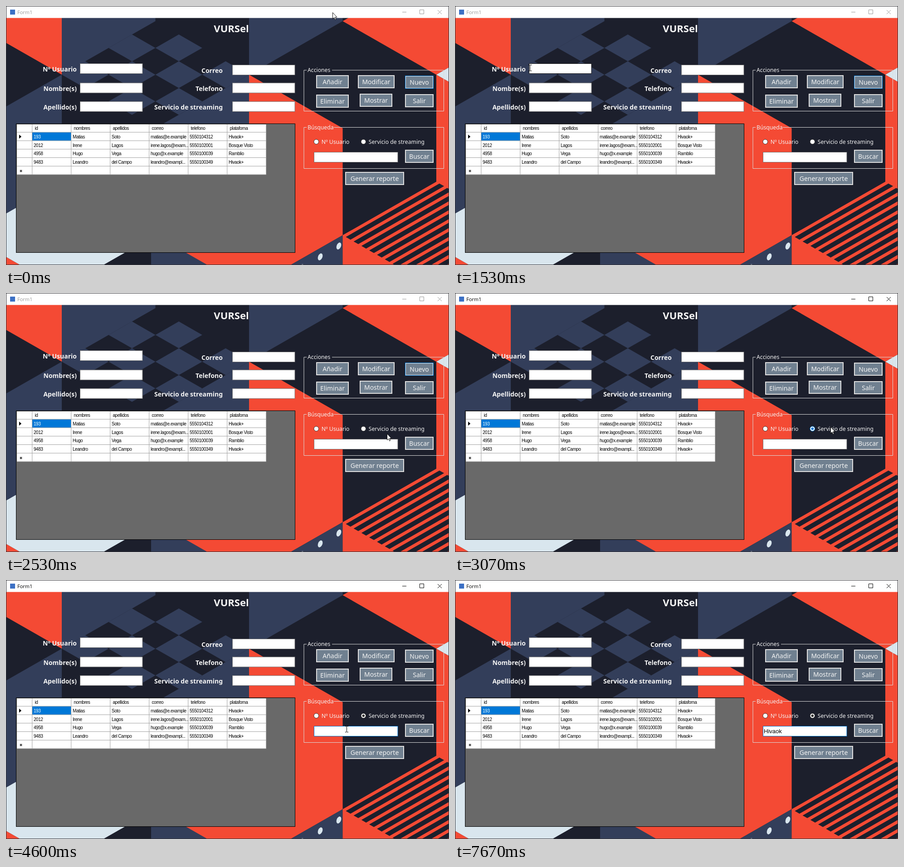
An HTML page for the animation above (8000 ms loop, 977 px wide and 573 px high).

```html
<!DOCTYPE html>
<html lang="es">
<head>
<meta charset="utf-8">
<style>
html, body { margin: 0; width: 100%; height: 100%; overflow: hidden; background: #1c1f2c; }
svg { display: block; width: 977px; height: 573px; }
text { font-family: "Noto Sans", "Open Sans", sans-serif; fill: #f4f4f4; white-space: pre; }
.title { font-size: 22px; font-weight: 700; text-anchor: middle; }
.label { font-size: 14px; font-weight: 600; text-anchor: end; }
.button { font-size: 14px; text-anchor: middle; }
.small { font-size: 12.2px; }
.caption { font: 11px "Open Sans", sans-serif; fill: inherit; }
.cell { font: 10px "Liberation Sans", Arial, sans-serif; letter-spacing: -.45px; fill: #000; }
.selected { fill: #fff; }
.typed { font: 13px "Liberation Sans", Arial, sans-serif; fill: #000; }
</style>
</head>
<body>
<svg id="stage" viewBox="0 0 977 573"></svg>
<script>
const DARK = '#1c1f2c', NAVY = '#333e5a', RED = '#f44a34', PALE = '#d9e6ee';
const BLUE = '#0078d7', GRAY = '#7a7a7a', LIGHT = '#e1e1e1';
const FRAME_MS = 200 / 3;
const stage = document.getElementById('stage');

const rect = (x, y, w, h, fill, extra = '') =>
  `<rect x="${x}" y="${y}" width="${w}" height="${h}" fill="${fill}" ${extra}/>`;
const text = (x, y, content, cls) => `<text x="${x}" y="${y}" class="${cls}">${content}</text>`;
const line = (d, stroke) => `<path d="${d}" fill="none" stroke="${stroke}"/>`;

// The backdrop lies on an isometric lattice; points are given in lattice units.
const poly = (fill, ...nodes) => `<polygon fill="${fill}" points="${
  nodes.map(([i, j]) => [123 + 206.5 * i, 33.5 + 118.4 * j]).join(' ')}"/>`;
// Part of the rhombus with left corner (i, j): a runs up its edge, b runs down.
function rhombus(fill, i, j, a0 = 0, a1 = 1, b0 = 0, b1 = 1) {
  const at = (a, b) => [i + a + b, j - a + b];
  return poly(fill, at(a0, b0), at(a1, b0), at(a1, b1), at(a0, b1));
}

function background() {
  let out = rect(0, 0, 977, 573, DARK)
    + poly(RED, [-1, -1], [0, -1], [0, 1], [-1, 0])
    + poly(NAVY, [0, -1], [1, -1], [1, 0], [0, 1])
    + poly(NAVY, [-1, 2], [0, 1], [0, 3], [-1, 4])
    + poly(RED, [-1, 4], [0, 5], [-1, 5])
    + rhombus(PALE, -1, 4)
    + rect(320, 500, 10, 73, NAVY)
    + poly(NAVY, [1, 2], [2, 1], [2, 5], [1, 5])
    + poly(NAVY, [2, -1], [3, -1], [3, 0], [2, 1])
    + poly(RED, [2, 1], [3, 2], [3, 4], [2, 5], [1, 4], [2, 3])
    + poly(NAVY, [3, 4], [3, 6], [2, 5])
    + rhombus(RED, 3, 0)
    + rhombus(PALE, 4, 1)
    + poly(RED, [4, 1], [5, 2], [5, 5], [3, 6], [3, 4], [4, 3]);
  for (let a = 0; a < 4; a++)
    for (let b = a % 2; b < 4; b += 2)
      out += rhombus(NAVY, 0, 1, a / 4, (a + 1) / 4, b / 4, (b + 1) / 4);
  for (let k = 0; k < 12; k++)
    out += rhombus(DARK, 3, 4, 0, 1, (k + .4) / 12, (k + 1) / 12);
  for (let k = 0; k < 3; k++)
    out += `<ellipse rx="4.8" ry="8" fill="${PALE}" transform="translate(${734 - 41 * k} ${531 + 24 * k}) rotate(22)"/>`;
  return out;
}

const titleBar = () => rect(0, 0, 977, 26.5, '#fff') + rect(9, 8, 11, 11, '#3c70c4')
  + `<g id="caption">${text(25, 17.5, 'Form1', 'caption')}
     <path d="M874 13.5H883M912.5 8.5H921.5V17.5H912.5ZM952 9L961 18M961 9L952 18" fill="none"/></g>`;

const textBox = (x, y, w, id = '') =>
  rect(x + .5, y + .5, w - 1, 22, '#fff', `id="${id}" stroke="${GRAY}"`);

const fields = (x, labelEnd, top, names) => names.map((name, i) => {
  const y = i ? 128.5 + 41.2 * i : top;
  return textBox(x, y, 138.5, name === 'Nº Usuario' ? 'userBox' : '')
    + text(labelEnd, y + 18, name, 'label');
}).join('');

const button = (x, y, w, name) => rect(x + 1, y + 1, w - 2, 27, '#708090', `stroke="${LIGHT}" stroke-width="2"`)
  + text(x + w / 2, y + 20, name, 'button');

const group = (y, bottom, legend, gapEnd) =>
  line(`M663 ${y}H657V${bottom}H965.5V${y}H${gapEnd}`, '#dcdcdc') + text(665, y + 4, legend, 'small');

const radio = (x, id, name) =>
  `<circle id="${id}" cx="${x}" cy="300.3" r="5.3" fill="#fff" stroke="#333"/>` + text(x + 11.5, 305, name, 'small');

function table() {
  const rows = [
    ['id', 'nombres', 'apellidos', 'correo', 'telefono', 'platafoma'],
    ['193', 'Matias', 'Soto', 'matias@e.example', '5550104312', 'Hivaok+'],
    ['2012', 'Irene', 'Lagos', 'irene.lagos@exam...', '5550102001', 'Bosque Visto'],
    ['4958', 'Hugo', 'Vega', 'hugo@x.example', '5550100039', 'Ramblio'],
    ['9483', 'Leandro', 'del Campo', 'leandro@exampl...', '5550100349', 'Hivaok+']
  ];
  const colX = i => 57.7 + 86 * i, rowY = j => 260.5 + 18.75 * j;
  let out = rect(22.5, 260.5, 615, 285, '#696969', 'stroke="#000"')
    + rect(24, 262, 550, 111, '#fff') + rect(colX(0), rowY(1), 86, 18.75, BLUE);
  for (let k = 0; k < 7; k++)
    out += line(`M${colX(k)} 262V373`, '#a0a0a0') + (k ? line(`M24 ${rowY(k)}H574`, '#a0a0a0') : '');
  rows.forEach((row, j) => row.forEach((value, i) => {
    out += text(colX(i) + (j ? 3.3 : 5.8), rowY(j) + 13.5, value, j === 1 && i === 0 ? 'cell selected' : 'cell');
  }));
  return out + '<path d="M29 284.5L34 289L29 293.5Z"/>'
    + line('M33 362V368M30.5 363.5L35.5 366.5M35.5 363.5L30.5 366.5', '#000');
}

const cursors = `
  <path id="arrow" d="M.5 .5V14.5L3.7 11.6L5.7 16.4L7.8 15.5L5.8 10.8H10Z" fill="#fff" stroke="#000" stroke-width=".9"/>
  <path id="beam" d="M-3 -6.5H0M1 -6.5H4M.5 -6V6M-3 6.5H0M1 6.5H4" fill="none" stroke="#000"/>
  <path id="resize" d="M-9 0L-4.5 -4V-1.3H4.5V-4L9 0L4.5 4V1.3H-4.5V4Z" fill="#fff" stroke="#000" stroke-width=".9"/>`;

stage.innerHTML = background() + titleBar() + text(497, 58, 'VURSel', 'title')
  + fields(163, 156, 127, ['Nº Usuario', 'Nombre(s)', 'Apellido(s)'])
  + fields(499, 478, 130, ['Correo', 'Telefono', 'Servicio de streaming'])
  + group(142, 232.5, 'Acciones', 719)
  + button(684, 153, 72, 'Añadir') + button(776, 153, 81, 'Modificar') + button(880, 154, 63, 'Nuevo')
  + rect(880.5, 154.5, 62, 28, 'none', `id="defaultFrame" stroke="${BLUE}"`)
  + button(684, 196, 72, 'Eliminar') + button(780, 194, 72, 'Mostrar') + button(880, 195, 63, 'Salir')
  + group(268.5, 359.5, 'Búsqueda', 723)
  + radio(684.3, 'byUser', 'Nº Usuario') + radio(788.3, 'byService', 'Servicio de streaming')
  + '<circle id="dot" cx="788.3" cy="300.3" r="2.8"/>'
  + textBox(679, 323, 185.5, 'searchBox') + button(880, 318, 63, 'Buscar')
  + button(748, 367, 130, 'Generar reporte')
  + table() + text(681, 339, '', 'typed" id="query') + rect(681, 326, 1, 16, '#000', 'id="caret"')
  + `<g id="pointer">${cursors}</g>`
  + rect(.5, .5, 976, 572, 'none', 'stroke="#35353a"');

const el = Object.fromEntries([...stage.querySelectorAll('[id]')].map(node => [node.id, node]));
const show = (node, visible) => node.setAttribute('visibility', visible ? 'inherit' : 'hidden');
const stroke = (node, color) => node.setAttribute('stroke', color);

// Pointer stops: time, x, y
const path = [
  [667, 720, 14], [1067, 235, 139], [1267, 231, 275], [1400, 126, 346], [1533, 164, 137],
  [1733, 627, 400], [1867, 868, 409], [2000, 886, 373], [2667, 828, 296], [3067, 828, 296], [3800, 751, 330]
];
// Typing bursts: start, interval, keys ("<" is backspace)
const bursts = [[5470, 200, 'Hia'], [6330, FRAME_MS, '<<<Hiva'], [7070, FRAME_MS, 'ok']];

function pointerAt(t) {
  const time = Math.floor(t / FRAME_MS + .1) * FRAME_MS;
  const next = path.findIndex(stop => stop[0] > time);
  if (next < 1) return path.at(next).slice(1);
  const [t0, x0, y0] = path[next - 1], [t1, x1, y1] = path[next];
  const k = (time - t0) / (t1 - t0);
  return [Math.round(x0 + (x1 - x0) * k), Math.round(y0 + (y1 - y0) * k)];
}

function typedAt(t) {
  let typed = '', lastKey = 4070;
  for (const [start, interval, keys] of bursts)
    [...keys].forEach((key, i) => {
      const time = start + i * interval;
      if (time > t) return;
      typed = key === '<' ? typed.slice(0, -1) : typed + key;
      lastKey = time;
    });
  return [typed, lastKey];
}

function draw(t) {
  const [x, y] = pointerAt(t);
  const inside = (left, top, w, h) => x >= left && x < left + w && y >= top && y < top + h;
  const overSearch = inside(679, 323, 185, 23);
  const overRadio = inside(782, 292, 143, 18);
  const onDivider = inside(58, 262, 522, 18) && (x - 52) % 86 < 12;
  const cursor = overSearch || inside(163, 127, 138, 23) ? 'beam' : onDivider ? 'resize' : 'arrow';
  for (const id of ['arrow', 'beam', 'resize']) show(el[id], id === cursor);
  el.pointer.setAttribute('transform', `translate(${x} ${y})`);
  show(el.pointer, t < 5470);

  const active = t >= 2800, checked = t >= 2930, focused = t >= 3930;
  el.caption.setAttribute('fill', active ? '#000' : '#999');
  stroke(el.caption.querySelector('path'), active ? '#000' : '#999');
  show(el.defaultFrame, !checked);
  stroke(el.byService, overRadio ? BLUE : '#333');
  el.dot.setAttribute('fill', overRadio ? BLUE : '#333');
  show(el.dot, checked);
  stroke(el.userBox, t >= 1060 && t < 1870 ? '#171717' : GRAY);
  stroke(el.searchBox, focused ? BLUE : overSearch ? '#171717' : GRAY);

  const [typed, lastKey] = typedAt(t);
  el.query.textContent = typed;
  el.caret.setAttribute('x', 681 + Math.round(typed ? el.query.getComputedTextLength() : 0));
  show(el.caret, t >= 4070 && Math.floor((t - lastKey) / 530) % 2 === 0);
}

function frame() {
  draw(performance.now() % 8000);
  requestAnimationFrame(frame);
}
frame();
</script>
</body>
</html>
```
